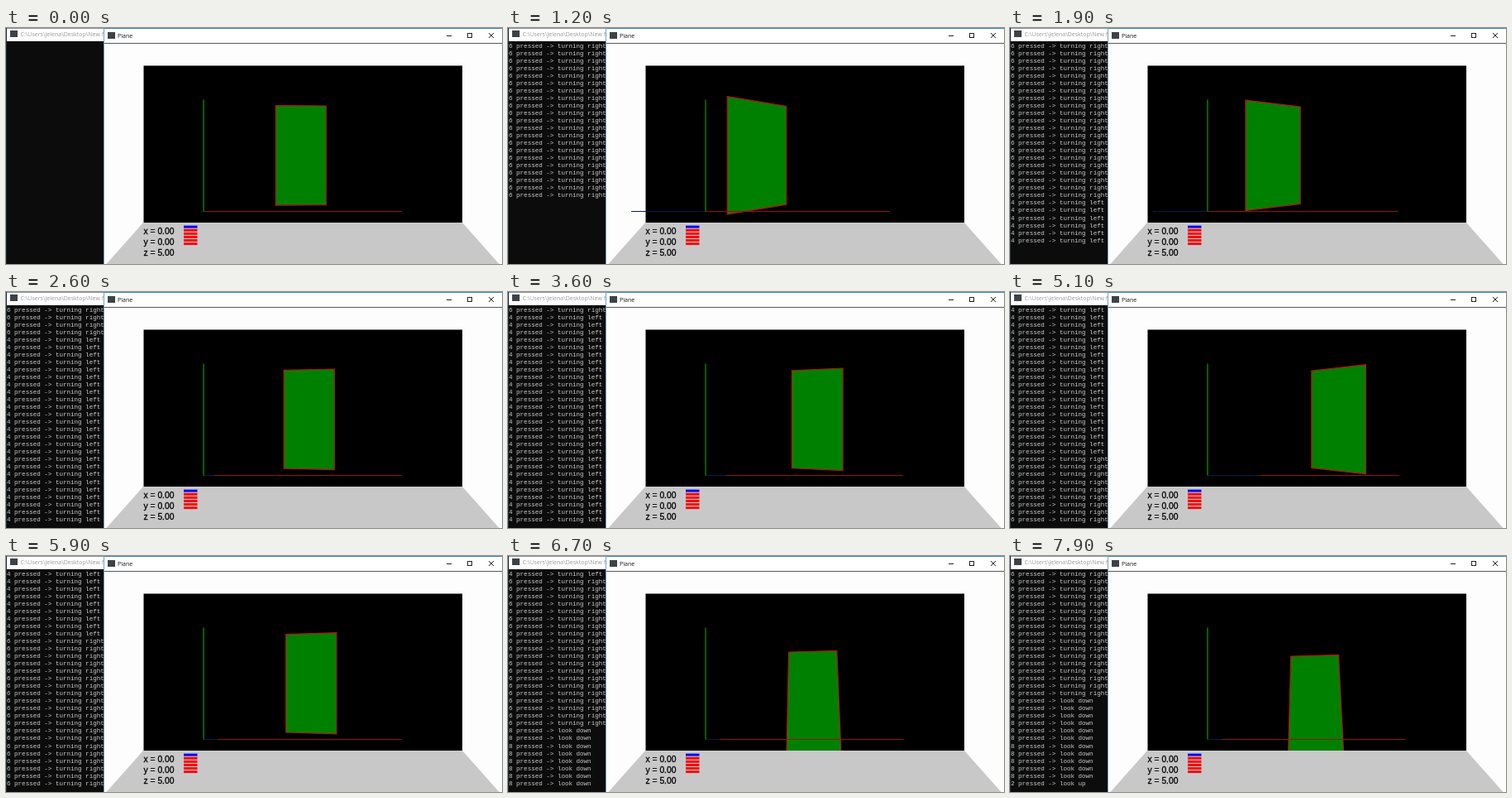
These frames come from a looping animation (600x285 px, 8000 ms). An HTML page with a canvas:

```html
<!DOCTYPE html>
<html lang="en">
<head>
<meta charset="utf-8">
<title>Plane</title>
<style>
  html, body { margin: 0; width: 100%; height: 100%; overflow: hidden; background: #fff; }
  canvas { display: block; width: 600px; height: 285px; }
</style>
</head>
<body>
<canvas id="stage" width="600" height="285"></canvas>
<script>
const ctx = document.getElementById('stage').getContext('2d');
const LOOP = 8000, TICK = 100, REPEAT = 33;
const ROWS = 29, ROW_H = 9.04;
const RAD = Math.PI / 180;
const UI = '"Open Sans", "Noto Sans", sans-serif';
const MONO = '"Liberation Mono", "DejaVu Sans Mono", monospace';

// Held keys: first press, start of auto-repeat, number of events, turn in degrees
const keys = [
  { text: '6 pressed -> turning right', press: 400, hold: 560, count: 21, yaw: -1, pitch: 0 },
  { text: '4 pressed -> turning left', press: 1300, hold: 1765, count: 25, yaw: 1, pitch: 0 },
  { text: '4 pressed -> turning left', press: 3400, hold: 3560, count: 21, yaw: 1, pitch: 0 },
  { text: '6 pressed -> turning right', press: 4400, hold: 4840, count: 20, yaw: -1, pitch: 0 },
  { text: '8 pressed -> look down', press: 6000, hold: 6500, count: 11, yaw: 0, pitch: 1 },
  { text: '2 pressed -> look up', press: 7500, hold: 7500, count: 1, yaw: 0, pitch: -1 }
];

function stateAt(t) {
  const state = { yaw: -1, pitch: 0, log: [] };
  for (const k of keys) {
    const repeats = Math.max(0, Math.floor((t - k.hold) / REPEAT) + 1);
    const n = t < k.press ? 0 : Math.min(k.count, 1 + repeats);
    state.yaw += n * k.yaw;
    state.pitch += n * k.pitch;
    for (let i = 0; i < n; i++) state.log.push(k.text);
  }
  return state;
}

function rect(color, x, y, w, h) {
  ctx.fillStyle = color;
  ctx.fillRect(x, y, w, h);
}

function line(color, x1, y1, x2, y2, width = 1) {
  ctx.strokeStyle = color;
  ctx.lineWidth = width;
  ctx.beginPath();
  ctx.moveTo(x1, y1);
  ctx.lineTo(x2, y2);
  ctx.stroke();
}

function polygon(points) {
  ctx.beginPath();
  points.forEach(([x, y]) => ctx.lineTo(x, y));
  ctx.closePath();
}

function label(str, x, y, font, color) {
  ctx.font = font;
  ctx.fillStyle = color;
  ctx.fillText(str, x, y);
}

function drawConsole(log) {
  rect('#0c0c0c', 0, 0, 119, 285);
  rect('#fff', 1, 0, 118, 16);
  rect('#8b9299', 0, 0, 119, 1);
  rect('#1d2a36', 0, 0, 1, 285);
  rect('#3c4247', 5, 3, 9, 8);
  label('C:\\Users\\Jelena\\Desktop\\New folder', 17.5, 10.3, '7px ' + UI, '#999');
  log.slice(-ROWS).forEach((str, i) =>
    label(str, 1, 23.6 + i * ROW_H, '7.55px ' + MONO, '#cccccc'));
}

function drawWindow() {
  rect('#fdfdfe', 118, 0, 482, 285);
  rect('#fff', 118, 0, 482, 18);
  rect('#3f86ab', 118, 0, 482, 1);
  rect('#6ea5c2', 118, 0, 1, 285);
  rect('#55585b', 119, 18, 481, 1);
  rect('#3c4247', 123, 5, 9, 8);
  label('Plane', 135, 12, '7px ' + UI, '#111');
  line('#222', 533, 9.5, 539, 9.5);
  ctx.strokeRect(558.5, 6.5, 5, 5);
  line('#222', 584, 6, 590, 12);
  line('#222', 590, 6, 584, 12);
}

// Project a corner of the plane after turning and tilting the camera
function corner(sx, sy, yaw, pitch) {
  const f = 136, X = sx * 30.5, Y = sy * 60;
  const x = X * Math.cos(yaw) + f * Math.sin(yaw);
  const z = f * Math.cos(yaw) - X * Math.sin(yaw);
  const y = Y * Math.cos(pitch) + z * Math.sin(pitch);
  const depth = z * Math.cos(pitch) - Y * Math.sin(pitch);
  return [359.2 + f * x / depth, 153.8 + f * y / depth];
}

function drawScene(yaw, pitch) {
  rect('#000', 166.5, 45.5, 385.5, 189.5);
  ctx.save();
  ctx.beginPath();
  ctx.rect(166.5, 45.5, 385.5, 189.5);
  ctx.clip();
  polygon([[-1, -1], [1, -1], [1, 1], [-1, 1]].map(([sx, sy]) => corner(sx, sy, yaw, pitch)));
  ctx.fillStyle = '#008000';
  ctx.fill();
  ctx.strokeStyle = '#b01414';
  ctx.lineWidth = 1.2;
  ctx.stroke();
  ctx.restore();
}

function drawPanel() {
  polygon([[166, 235], [552, 235], [596.5, 285], [121.5, 285]]);
  ctx.fillStyle = '#c9c8c9';
  ctx.fill();
  ctx.strokeStyle = '#000';
  ctx.lineWidth = 0.3;
  ['x = 0.00', 'y = 0.00', 'z = 5.00'].forEach((str, i) => {
    const y = 249 + i * 13;
    label(str, 166.5, y, '10.3px "Liberation Sans", sans-serif', '#000');
    ctx.strokeText(str, 166.5, y);
  });
  for (let i = 0; i < 6; i++) {
    rect(i ? '#f50a0a' : '#0a0af0', 215, 238.6 + i * 4.1, 16.5, 3);
  }
}

function drawAxes(yaw) {
  const ox = 239, oy = 221.5, len = 240;
  line('#0a1c50', ox, oy, ox + len * Math.sin(yaw), oy);
  const start = ox + Math.max(0, len * Math.sin(yaw));
  line('#941414', start, oy, ox + len * Math.cos(yaw), oy);
  line('#0c9a0c', ox, oy, ox, 86.5, 1.2);
}

function frame(now) {
  const t = Math.floor((now % LOOP) / TICK) * TICK;
  const { yaw, pitch, log } = stateAt(t);
  drawConsole(log);
  drawWindow();
  drawScene(yaw * RAD, pitch * RAD);
  drawPanel();
  drawAxes(yaw * RAD);
}

const begin = performance.now();
function loop() {
  frame(performance.now() - begin);
  requestAnimationFrame(loop);
}
loop();
</script>
</body>
</html>
```
